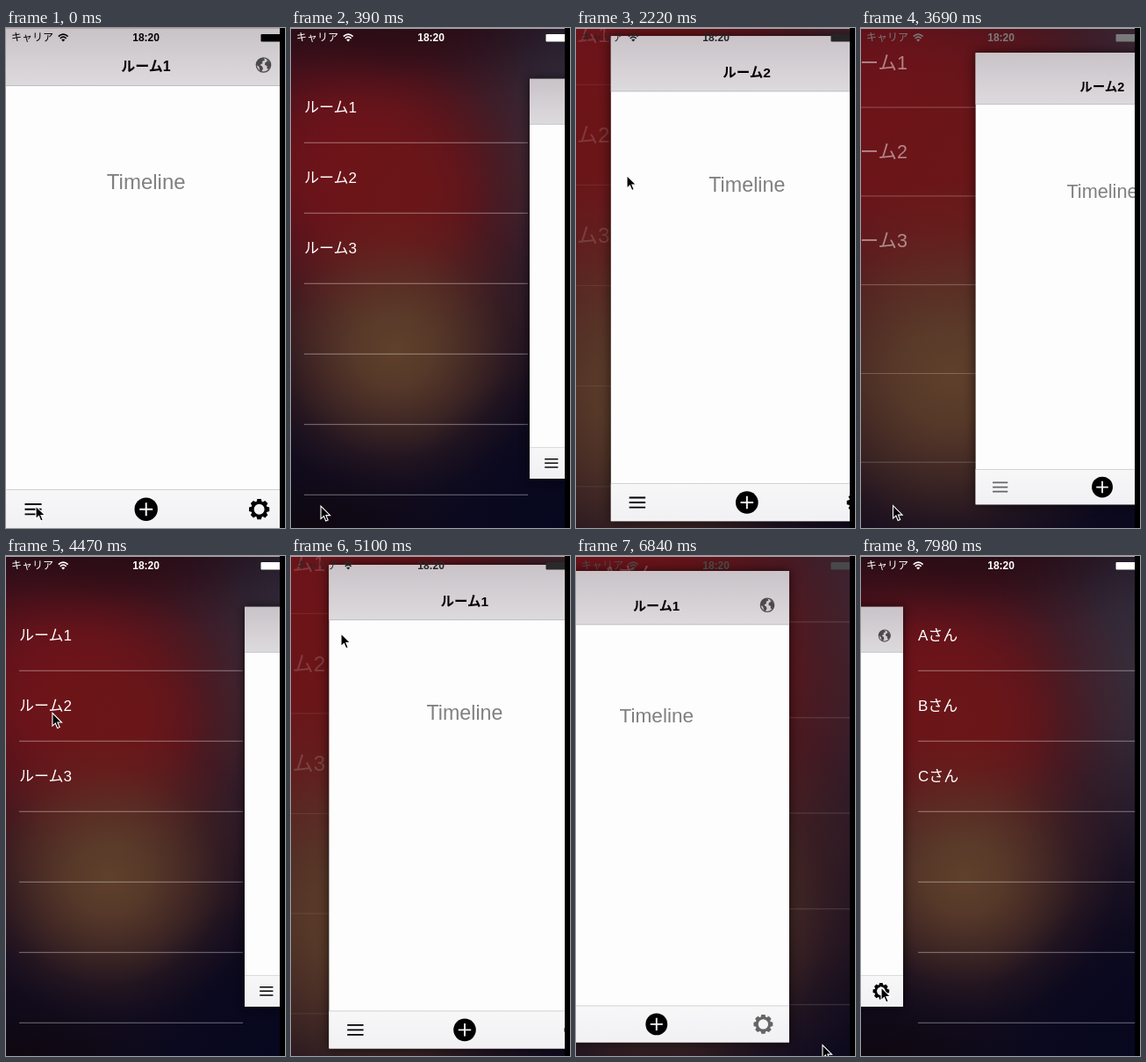
An HTML page that plays this animation: 318x568 px, repeating every 8 s.

```html
<!DOCTYPE html>
<html lang="ja">
<head>
<meta charset="utf-8">
<title>Side menu</title>
<style>
html, body { margin: 0; width: 100%; height: 100%; overflow: hidden; background: #000; }
svg { display: block; width: 100vw; height: 100vh; }
text { font-family: "Liberation Sans", "Noto Sans CJK JP", sans-serif; }
</style>
</head>
<body>
<svg viewBox="0 0 318 568" preserveAspectRatio="none">
  <defs id="defs">
    <clipPath id="screen"><rect width="312" height="568"/></clipPath>
    <filter id="blur" x="-20%" y="-20%" width="140%" height="140%"><feGaussianBlur stdDeviation="7"/></filter>
    <linearGradient id="navFill" x2="0" y2="1">
      <stop stop-color="#c9c3c8"/><stop offset="1" stop-color="#dddadd"/>
    </linearGradient>
    <linearGradient id="barFill" x2="0" y2="1">
      <stop stop-color="#f7f7f8"/><stop offset="1" stop-color="#f1f1f4"/>
    </linearGradient>
  </defs>
  <rect width="318" height="568"/>
  <g clip-path="url(#screen)">
    <g id="backdrop"><rect width="320" height="570" fill="#0b0a1e"/></g>
    <g id="leftMenu"></g>
    <g id="rightMenu"></g>
    <g id="content">
      <rect y="1" width="320" height="567.5" opacity=".65" filter="url(#blur)"/>
      <rect y="1" width="320" height="567.5" fill="#fdfdfd"/>
      <rect y="1" width="320" height="64.5" fill="url(#navFill)"/>
      <path d="M0 65.5H320" stroke="#b4b1b5" stroke-width=".8"/>
      <text id="title" x="159.5" y="49" font-size="16" font-weight="700" text-anchor="middle"></text>
      <g transform="translate(293.5 42)" fill="#4a494b">
        <circle r="8.2" fill="#cfcbce" stroke="#4a494b" stroke-width="1.3"/>
        <path d="M-7.5-3.5Q-5-8 0-8L1.5-5.5-1.5-4-1-2-4 0-1.5 1.5-.5 4-2.5 8-4.5 5-5 2-8 0Z"/>
        <path d="M3-7Q8-4 8 1L6 5 4 4 4 1 1.5 0 2-3 4.5-4Z"/>
      </g>
      <text x="159.7" y="183" font-size="24" fill="#808080" text-anchor="middle">Timeline</text>
      <rect y="524.5" width="320" height="44" fill="url(#barFill)"/>
      <path d="M0 524.5H320" stroke="#c6c6c9" stroke-width=".8"/>
      <path id="burger" d="M21.5 541H40.5M21.5 546.7H40.5M21.5 552.4H40.5" stroke="#000" stroke-width="1.9"/>
      <circle cx="159.7" cy="546.7" r="13.2"/>
      <path d="M152.2 546.7H167.2M159.7 539.2V554.2" stroke="#f7f7f8" stroke-width="2"/>
      <g id="gear" transform="translate(288.6 546.7)"></g>
    </g>
    <g id="status">
      <text x="6" y="15.3" font-size="12">キャリア</text>
      <path d="M59.8 9.6Q65.2 4.6 70.6 9.6M61.8 11.8Q65.2 8.6 68.6 11.8" fill="none" stroke="currentColor" stroke-width="1.7"/>
      <path d="M65.2 15.6L63.2 13.4Q65.2 11.8 67.2 13.4Z"/>
      <text x="159.6" y="15.3" font-size="12" font-weight="700" text-anchor="middle">18:20</text>
      <rect x="290.5" y="7" width="22" height="8.6" rx="1"/>
    </g>
    <rect width="312" height=".8" fill="#cccccd"/>
    <path id="cursor" d="M0 0V14.6L3.4 11.5 5.7 17 8.2 16 5.9 10.6H10.6Z" stroke="#fff" stroke-width="1.1"/>
  </g>
</svg>
<script>
const LOOP = 8000, SLIDE = 350, CX = 160, CY = 285;
const $ = id => document.getElementById(id);

function add(parent, tag, attrs, text) {
  const el = document.createElementNS("http://www.w3.org/2000/svg", tag);
  for (const k in attrs) el.setAttribute(k, attrs[k]);
  if (text) el.textContent = text;
  return parent.appendChild(el);
}

// Soft ellipse with a smooth falloff.
function blob(cx, cy, rx, ry, color) {
  const id = "glow" + $("defs").children.length;
  const grad = add($("defs"), "radialGradient", { id });
  for (let i = 0; i <= 4; i++)
    add(grad, "stop", { offset: i / 4, "stop-color": color, "stop-opacity": smooth(1 - i / 4) });
  add($("backdrop"), "ellipse", { cx, cy, rx, ry, fill: `url(#${id})` });
}

const clamp = v => Math.min(1, Math.max(0, v));
const smooth = v => v * v * (3 - 2 * v);

blob(315, 130, 230, 300, "#34303f");
blob(110, 220, 280, 370, "#4c1a1e");
blob(60, 150, 240, 230, "#70121a");
blob(120, 190, 150, 150, "#6b1618");
blob(118, 365, 175, 165, "#5e402b");
blob(110, -15, 280, 100, "#2a0c14");
blob(320, 570, 200, 190, "#07071f");
blob(10, 590, 200, 110, "#10080f");

function menu(id, x, right, labels) {
  for (let i = 0; i < 6; i++) {
    const y = 130 + 80 * i;
    add($(id), "path", { d: `M${x} ${y + 0.3}H${right}`, stroke: "#fff", "stroke-opacity": 0.45, "stroke-width": 0.9 });
    if (labels[i]) add($(id), "text", { x, y: y - 33.7, "font-size": 17, fill: "#fff" }, labels[i]);
  }
}
menu("leftMenu", 15, 270, ["ルーム1", "ルーム2", "ルーム3"]);
menu("rightMenu", 65, 320, ["Aさん", "Bさん", "Cさん"]);

for (let i = 0; i < 8; i++)
  add($("gear"), "path", { d: "M-3.2-8L-2.2-11.6H2.2L3.2-8Z", transform: `rotate(${45 * i})` });
add($("gear"), "circle", { r: 7.6, fill: "none", stroke: "#000", "stroke-width": 3.2 });

// cubic-bezier(.42, 0, .58, 1)
function easeInOut(x) {
  let lo = 0, hi = 1;
  for (let i = 0; i < 24; i++) {
    const s = (lo + hi) / 2, r = 1 - s;
    if (1.26 * s * r * r + 1.74 * s * s * r + s * s * s < x) lo = s; else hi = s;
  }
  return smooth(lo);
}

const OPEN = [15, 3520, 6712], CLOSE = [1964, 4848];
const step = (t, start) => easeInOut(clamp((t - start) / SLIDE));
const sum = (list, t) => list.reduce((a, s) => a + step(t, s), 0);

// Pointer moves: start, end, x, y
const START = [34, 543];
const MOVES = [
  [420, 1170, 59, 138],
  [1240, 1600, 58, 167.5],
  [3105, 3460, 36.5, 542.5],
  [3950, 4680, 57, 88],
  [5750, 6320, 281, 555.5],
  [7470, 7960, 23, 490]
];

function pointer(t) {
  let [x, y] = START;
  for (const [a, b, tx, ty] of MOVES) {
    const k = smooth(clamp((t - a) / (b - a)));
    x += (tx - x) * k;
    y += (ty - y) * k;
  }
  return `translate(${x} ${y})`;
}

const zoom = (s, cx = CX) => `translate(${cx} ${CY}) scale(${s}) translate(${-CX} ${-CY})`;
const pressed = (t, start) => t < start ? 1 : 0.58 + 0.42 * clamp((t - start - 170) / 230);

function draw(t) {
  const p = sum(OPEN, t) - sum(CLOSE, t);
  const toRight = t >= 6000;
  $("backdrop").setAttribute("transform", zoom(1.7 - 0.7 * p));
  for (const id of ["leftMenu", "rightMenu"]) {
    $(id).setAttribute("transform", zoom(1.5 - 0.5 * p));
    $(id).setAttribute("opacity", (id === "rightMenu") === toRight ? p : 0);
  }
  $("content").setAttribute("transform", zoom(1 - 0.2 * p, CX + (toRight ? -240 : 240) * p));
  $("title").textContent = t >= CLOSE[0] && t < CLOSE[1] ? "ルーム2" : "ルーム1";
  $("burger").setAttribute("opacity", pressed(t, OPEN[0]) * pressed(t, OPEN[1]));
  $("gear").setAttribute("opacity", pressed(t, OPEN[2]));
  const level = 255 * p, ink = `rgb(${level},${level},${level})`;
  $("status").setAttribute("fill", ink);
  $("status").setAttribute("color", ink);
  $("cursor").setAttribute("transform", pointer(t));
}

const origin = performance.now();
function tick() {
  draw((performance.now() - origin) % LOOP);
  requestAnimationFrame(tick);
}
draw(0);
requestAnimationFrame(tick);
</script>
</body>
</html>
```
